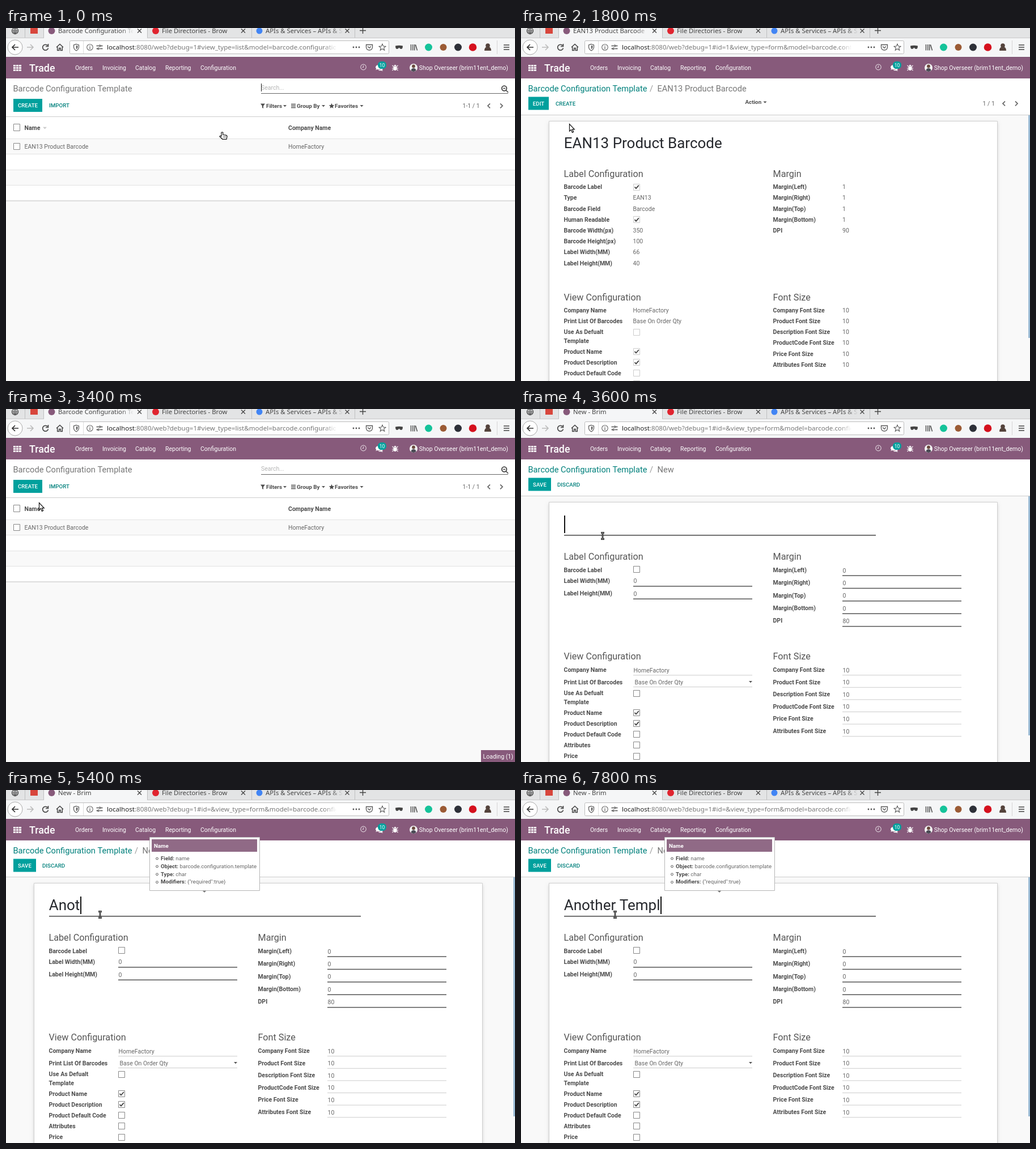
Recreate the animation shown at these times as an HTML page with a canvas. Size 898 by 623 pixels, loop 8000 ms.

```html
<!DOCTYPE html>
<html lang="en">
<head>
<meta charset="utf-8">
<title>Barcode Configuration Template</title>
<style>
html, body { margin: 0; width: 100%; height: 100%; overflow: hidden; background: #f9f9f9; }
canvas { display: block; }
</style>
</head>
<body>
<canvas id="stage" width="898" height="623"></canvas>
<script>
const c = document.getElementById('stage').getContext('2d');
const LOOP = 8000, BASE = 10.53, SMALL = 9.72, CRUMB = 14.65;
const PURPLE = '#875a7b', TEAL = '#00a09d', LINK = '#00807c', TEXT = '#666', LABEL = '#4c4c4c';
const UI = 'Roboto, sans-serif', CHROME = '"Noto Sans", "Open Sans", sans-serif';
const COMPANY = 'HomeFactory';

// y is the middle of the capital letters
function text(s, x, y, { size = BASE, weight = 400, color = TEXT, font = UI, align = 'left' } = {}) {
  c.font = `${weight} ${size}px ${font}`;
  c.fillStyle = color;
  c.textAlign = align;
  c.fillText(s, x, y + size * 0.355);
  return c.measureText(s).width;
}
const bold = (s, x, y, color = LABEL, size = BASE) => text(s, x, y, { weight: 700, color, size });

function rect(x, y, w, h, color) {
  c.fillStyle = color;
  c.fillRect(x, y, w, h);
}
function dot(x, y, r, color) {
  c.fillStyle = color;
  c.beginPath();
  c.arc(x, y, r, 0, 7);
  c.fill();
}
function ring(x, y, r, color, width = 1.3) {
  c.strokeStyle = color;
  c.lineWidth = width;
  c.beginPath();
  c.arc(x, y, r, 0, 7);
  c.stroke();
}
function path(d, x, y, stroke, width = 1.3, fill) {
  const p = new Path2D(d);
  c.save();
  c.translate(x, y);
  if (fill) { c.fillStyle = fill; c.fill(p); }
  if (stroke) { c.strokeStyle = stroke; c.lineWidth = width; c.stroke(p); }
  c.restore();
}
function frame(x, y, w, h, border, fill, r = 0) {
  c.beginPath();
  c.roundRect(x + 0.5, y + 0.5, w - 1, h - 1, r);
  c.fillStyle = fill;
  c.fill();
  c.strokeStyle = border;
  c.lineWidth = 1;
  c.stroke();
}
function fade(x, y, w, h, rgb) {
  const g = c.createLinearGradient(x, 0, x + w, 0);
  g.addColorStop(0, `rgba(${rgb},0)`);
  g.addColorStop(1, `rgb(${rgb})`);
  rect(x, y, w, h, g);
}
const caretDown = (x, y) => path('M-3 -1.5H3L0 1.7Z', x, y, null, 0, '#555');

function check(y, on, border = '#ccc') {
  frame(198, Math.round(y - 6), 12, 12, border, '#fff');
  if (on) path('M-3.5 0L-1 2.7L3.8 -2.8', 204, y, '#444', 1.8);
}
function button(s, w, y) {
  rect(13, y - 12, w, 23, TEAL);
  text(s, 13 + w / 2, y, { size: SMALL, weight: 500, color: '#fff', align: 'center' });
}
const action = (s, x, y) => text(s, x, y, { size: SMALL, weight: 500, color: LINK });

function pager(s, x, y) {
  text(s, x, y);
  path('M2 -4L-2 0L2 4', 852, y, '#666', 1.7);
  path('M-2 -4L2 0L-2 4', 874, y, '#666', 1.7);
}

function tab(s, x, end, rgb) {
  c.save();
  c.beginPath();
  c.rect(x, 0, end - x, 17);
  c.clip();
  text(s, x, 4.8, { size: 11.3, color: '#444', font: CHROME });
  c.restore();
  fade(end - 22, 0, 22, 16, rgb);
}

function chrome(title, url) {
  rect(0, 0, 898, 51, '#f5f6f7');
  rect(0, 0, 898, 17, '#e3e4e5');
  rect(0, 17, 898, 1, '#c9c9ca');
  rect(67, 0, 182, 18, '#f5f6f7');
  for (const x of [33, 66, 249, 433, 615]) rect(x, 0, 1, 17, '#bfbfc0');
  ring(16, 5, 5.5, '#444');
  path('M-5.5 0H5.5M0 -5.5V5.5M-5 3H5M0 -5.5Q-5 0 0 5.5Q5 0 0 -5.5', 16, 5, '#444', 0.9);
  rect(43, 0, 13, 10, '#d8463c');
  dot(80.5, 5, 6, PURPLE);
  dot(264, 5, 6, '#e0242f');
  dot(447, 5, 5.5, '#4285f4');
  tab(title, 92, 225, '245,246,247');
  tab('File Directories - Brow', 275, 411, '227,228,229');
  tab('APIs & Services – APIs & S', 458, 595, '227,228,229');
  for (const x of [235.5, 418.5, 602]) path('M-3.5 -3.5L3.5 3.5M3.5 -3.5L-3.5 3.5', x, 5, '#444', 1.3);
  path('M-5.5 0H5.5M0 -5.5V5.5', 629.5, 4.5, '#444', 1.4);

  dot(16, 34, 13, '#fff');
  ring(16, 34, 13, '#aaa', 1);
  path('M6 0H-5M0 -5L-5 0L0 5', 16, 34, '#333', 1.7);
  path('M-6 0H5M0 -5L5 0L0 5', 43, 34, '#bbb', 1.6);
  path('M4 -3A5 5 0 1 0 5 1.5M5 -6V-1.5H0.5', 69.5, 34, '#444', 1.6);
  path('M-6 0L0 -5.5L6 0M-4.3 -1V5.5H-1.3V1.5H1.3V5.5H4.3V-1', 95, 34, '#444', 1.5);
  frame(112, 22, 564, 24, '#bdbdbd', '#fff', 2);
  path('M0 -5.5L4.5 -4V0Q4 4 0 6Q-4 4 -4.5 0V-4Z', 124, 34, '#555', 1.2);
  path('M0 -3.3L2.4 -2.5V0Q2 2.5 0 3.6Z', 124, 34, null, 0, '#555');
  rect(136, 23, 1, 22, '#ddd');
  ring(148, 34, 5.3, '#666', 1.1);
  rect(147.4, 31, 1.3, 1.3, '#666');
  rect(147.4, 33.3, 1.3, 4, '#666');
  path('M-5 -2.5H-1M2 -2.5H6M-5 2.5H-2M1 2.5H6', 164.5, 34, '#555', 1.4);
  ring(165.5, 31.5, 1.4, '#555', 1.1);
  ring(163, 36.5, 1.4, '#555', 1.1);
  c.save();
  c.beginPath();
  c.rect(177, 23, 405, 22);
  c.clip();
  const w = text('localhost', 178, 34.2, { size: 11.6, color: '#222', font: CHROME });
  text(url, 178 + w, 34.2, { size: 11.6, color: '#777', font: CHROME });
  c.restore();
  fade(560, 24, 24, 20, '255,255,255');
  for (const x of [613, 618, 623]) dot(x, 34, 1.4, '#555');
  path('M-5.5 -4.5H5.5V0Q5 5 0 5Q-5 5 -5.5 0ZM-2.8 -1.5L0 1.4L2.8 -1.5', 641, 34, '#555', 1.3);
  path('M0 -5.8L1.7 -1.9L5.8 -1.6L2.6 1.1L3.7 5.2L0 2.9L-3.7 5.2L-2.6 1.1L-5.8 -1.6L-1.7 -1.9Z', 664, 34, '#555', 1.1);
  path('M-6.5 -2.5Q0 -4 6.5 -2.5Q6.5 3 3.5 3Q1 3 0 0.6Q-1 3 -3.5 3Q-6.5 3 -6.5 -2.5Z', 693.5, 34, null, 0, '#444');
  path('M-5 -5V5.5M-1.7 -5V5.5M1.3 -5V5.5M3 -4.5L6 5.5', 719.5, 34, '#444', 1.4);
  dot(745.5, 34, 6.5, '#15c39a');
  dot(771.5, 34, 6, '#9b5b35');
  dot(797.5, 34, 6.5, '#2d3038');
  dot(823.5, 34, 6.8, '#d5101d');
  dot(850, 31, 3.8, '#54433c');
  path('M-6 6Q-6 -1 0 -1Q6 -1 6 6Z', 850, 34, null, 0, '#54433c');
  rect(866, 22, 1, 24, '#d5d5d5');
  path('M-5 -4H5M-5 0H5M-5 4H5', 883, 34, '#444', 1.4);
}

function navbar() {
  rect(0, 51, 898, 38, PURPLE);
  rect(0, 51, 898, 1, '#77506d');
  for (let i = 0; i < 9; i++) rect(13 + i % 3 * 5, 65 + Math.floor(i / 3) * 4, 4, 3, '#fff');
  text('Trade', 41, 70.5, { size: 17.8, weight: 500, color: '#fff' });
  const menu = { Orders: 122, Invoicing: 170, Catalog: 228, Reporting: 281, Configuration: 343 };
  for (const s in menu) text(s, menu[s], 70.5, { color: '#fff' });
  ring(630.5, 69, 4.8, '#d8c9d4', 1.2);
  path('M0 -3V0.5H-2', 630.5, 69, '#d8c9d4', 1.1);
  path('M-6 -1Q-5 -5 0 -5Q5 -4 4 1Q2 4 -3 3L-6 4L-4.5 2Q-6 1 -6 -1ZM5.5 -1Q8 2 5.5 4L7 6L3 5Q0 6 -1 4Q4 4 5.5 -1Z', 658, 70, null, 0, '#fff');
  c.beginPath();
  c.roundRect(656, 59, 15, 13, 6);
  c.fillStyle = TEAL;
  c.fill();
  text('10', 663.5, 65.7, { size: 8.5, color: '#fff', align: 'center' });
  path('M-5 -4L-3 -2M5 -4L3 -2M-5.5 1H5.5M-5 5L-3 3M5 5L3 3', 686.5, 70, '#fff', 1.1);
  path('M-3 -2H3V2Q2.5 5 0 5Q-2.5 5 -3 2ZM-2.3 -2.6Q-2 -5 0 -5Q2 -5 2.3 -2.6Z', 686.5, 70, null, 0, '#fff');
  dot(719, 70, 7, '#f2f2f2');
  dot(719, 67.5, 2.9, '#6b4a3e');
  path('M-4.5 5Q-4 1 0 1Q4 1 4.5 5Q0 9 -4.5 5Z', 719, 70, null, 0, '#4a4a55');
  text('Shop Overseer (brim11ent_demo)', 886, 70.5, { color: '#fff', align: 'right' });
}

function listPage(sorted, searchCaret) {
  rect(0, 89, 898, 67, '#fff');
  text('Barcode Configuration Template', 12.5, 107, { size: CRUMB, color: '#777' });
  text('Search...', 450, 105.5, { color: '#b5b5b5' });
  if (searchCaret) rect(450, 98, 1, 14, '#222');
  rect(450, 115, 436, 1, '#666');
  ring(879, 106.5, 4.3, '#444', 1.8);
  path('M0 0L4 4M-5 -3.3H-1', 882, 109.8, '#444', 1.6);
  button('CREATE', 51, 137);
  action('IMPORT', 76, 137);
  path('M-4 -4H4L1 0V4.5L-1 3V0Z', 453, 137.5, null, 0, LABEL);
  bold('Filters', 459, 137.3, LABEL, 9.9);
  caretDown(492, 137.5);
  path('M-4 -3H4M-4 0H4M-4 3H4', 507, 137.5, LABEL, 1.5);
  bold('Group By', 513, 137.3, LABEL, 9.9);
  caretDown(560, 137.5);
  path('M0 -4.8L1.4 -1.6L4.8 -1.3L2.2 0.9L3 4.3L0 2.5L-3 4.3L-2.2 0.9L-4.8 -1.3L-1.4 -1.6Z', 574.5, 137.5, null, 0, LABEL);
  bold('Favorites', 580, 137.3, LABEL, 9.9);
  caretDown(627.5, 137.5);
  pager('1-1 / 1', 805.5, 137.3);

  rect(0, 156, 898, 149, '#fff');
  rect(0, 156, 898, 1, '#ccc');
  rect(0, 195, 898, 28, '#f9f9f9');
  rect(0, 250, 898, 27, '#f9f9f9');
  for (const y of [195, 222, 250, 277]) rect(0, y, 898, 1, '#e2e2e2');
  rect(0, 304.5, 898, 1, '#c0c0c0');
  frame(13, 169, 12, 13, '#888', '#fff');
  frame(13, 203, 12, 12, '#888', '#fff');
  bold('Name', 32.5, 176.3);
  if (sorted) path('M-3.5 -1.7H3.5L0 2Z', 68.5, 176.5, null, 0, '#ccc');
  bold('Company Name', 498, 176.3);
  text('EAN13 Product Barcode', 32.5, 209.2);
  text(COMPANY, 498, 209.2);
}

function formPage(crumb, hover, thumbEnd) {
  rect(0, 89, 898, 64, '#fff');
  rect(0, 153, 898, 1, '#ccc');
  const w = text('Barcode Configuration Template', 12.5, 107, { size: CRUMB, color: hover ? '#005451' : LINK });
  text('/', 17 + w, 107, { size: CRUMB, color: '#999' });
  text(crumb, 240.5, 107, { size: CRUMB, color: '#777' });
  c.save();
  c.shadowColor = 'rgba(0,0,0,.2)';
  c.shadowBlur = 6;
  c.shadowOffsetY = 3;
  rect(50, 164, 790, 470, '#fff');
  c.restore();
  frame(49, 164, 792, 480, '#cfcfcf', '#fff');
  rect(895, 154, 3, thumbEnd - 154, '#9dbdd6');
}
const heading = (s, x, y) => text(s, x, y, { size: 16.2, color: '#555' });
const bigTitle = s => text(s, 75.7, 203.2, { size: 26, color: '#26282d' });

const MARGINS = ['Margin(Left)', 'Margin(Right)', 'Margin(Top)', 'Margin(Bottom)', 'DPI'];
const FONTS = ['Company', 'Product', 'Description', 'ProductCode', 'Price', 'Attributes'].map(s => s + ' Font Size');

function flags(y, border) {
  bold('Use As Defualt', 75.5, y);
  bold('Template', 75.5, y + 15.5);
  check(y, false, border);
  ['Product Name', 'Product Description', 'Product Default Code', 'Attributes', 'Price'].forEach((s, i) => {
    const row = y + 34.3 + i * 19.2;
    bold(s, 75.5, row);
    check(row, i < 2, border);
  });
}

function viewForm(hover) {
  formPage('EAN13 Product Barcode', hover, 547);
  button('EDIT', 36, 133.5);
  action('CREATE', 61, 133.5);
  bold('Action', 395.5, 131, LABEL, 9.8);
  caretDown(430.5, 131);
  pager('1 / 1', 814.5, 133.3);
  bigTitle('EAN13 Product Barcode');
  heading('Label Configuration', 75.5, 257.5);
  heading('Margin', 444.5, 257.5);
  const label = { 'Barcode Label': 1, Type: 'EAN13', 'Barcode Field': 'Barcode', 'Human Readable': 1,
    'Barcode Width(px)': '350', 'Barcode Height(px)': '100', 'Label Width(MM)': '66', 'Label Height(MM)': '40' };
  Object.entries(label).forEach(([s, v], i) => {
    const y = 280.5 + i * 19.2;
    bold(s, 75.5, y);
    if (v === 1) check(y, true); else text(v, 197.5, y);
  });
  MARGINS.forEach((s, i) => {
    bold(s, 444.5, 280.5 + i * 19.2);
    text(i < 4 ? '1' : '90', 567, 280.5 + i * 19.2);
  });
  heading('View Configuration', 75.5, 475);
  heading('Font Size', 444.5, 475);
  bold('Company Name', 75.5, 498);
  text(COMPANY, 197.5, 498);
  bold('Print List Of Barcodes', 75.5, 517.2);
  text('Base On Order Qty', 197.5, 517.2);
  flags(536.5);
  FONTS.forEach((s, i) => {
    bold(s, 444.5, 498 + i * 19.2);
    text('10', 567, 498 + i * 19.2);
  });
}

function field(s, v, x, y, strong, labelDy = 0) {
  bold(s, x, y + labelDy);
  const left = x < 400 ? 198 : 567;
  text(v, left + 0.5, y + 0.6);
  if (strong) rect(left, y + 9, 210, 1.5, '#555');
  else rect(left, y + 9, 210, 1, '#ccc');
}

function editForm(name, caret, popup) {
  formPage('New', false, 576);
  button('SAVE', 40, 133.5);
  action('DISCARD', 64, 133.5);
  rect(76, 222, 550, 1.5, '#444');
  const w = bigTitle(name);
  if (caret) rect(Math.round(76 + w), 188, 2, 31, '#111');
  if (popup) frame(75, 223, 550, 20, '#bbb', '#fff');
  heading('Label Configuration', 75.5, 260.5);
  heading('Margin', 444.5, 260.5);
  bold('Barcode Label', 75.5, 284);
  check(283, false, '#888');
  field('Label Width(MM)', '0', 75.5, 303, true);
  field('Label Height(MM)', '0', 75.5, 325.5, true);
  MARGINS.forEach((s, i) => field(s, i < 4 ? '0' : '80', 444.5, 284.3 + i * 22.4, true, -0.3));
  heading('View Configuration', 75.5, 436.5);
  heading('Font Size', 444.5, 436.5);
  field('Company Name', COMPANY, 75.5, 460.3, false);
  field('Print List Of Barcodes', '', 75.5, 481, false, 0.8);
  text('Base On Order Qty', 200.5, 482);
  caretDown(405, 481.5);
  flags(501.5, '#888');
  FONTS.forEach((s, i) => field(s, '10', 444.5, 460.2 + i * 21.6, false));
}

function tooltip(alpha) {
  c.save();
  c.globalAlpha = alpha;
  path('M-4 0H4L0 4Z', 350, 177, null, 0, '#777');
  frame(253, 83, 195, 95, '#b5b5b5', '#fff');
  rect(257, 87, 186, 22, '#906a86');
  bold('Name', 261, 98.3, '#fff', SMALL);
  const info = { 'Field:': 'name', 'Object:': 'barcode.configuration.template', 'Type:': 'char', 'Modifiers:': '{"required":true}' };
  Object.entries(info).forEach(([k, v], i) => {
    const y = 120.3 + i * 13.9;
    ring(266.5, y + 0.7, 1.9, '#555', 1);
    const w = bold(k, 273, y, LABEL, SMALL);
    text(v, 273 + w + 2.4, y, { size: SMALL });
  });
  c.restore();
}

function loading() {
  rect(838, 602, 60, 21, PURPLE);
  text('Loading (1)', 841.5, 613, { color: '#fff' });
}

// time, x, y, shape
const MOVES = [
  [0, 376, 183, 'hand'], [100, 300, 208, 'hand'], [400, 300, 208, 'hand'], [500, 171, 208, 'hand'],
  [700, 171, 208, 'hand'], [800, 174, 225, 'arrow'], [1500, 150, 428, 'arrow'], [1800, 85, 169, 'arrow'],
  [2300, 80, 108, 'hand'], [2400, 80, 108, 'hand'], [2500, 86, 115, 'beam'], [2700, 38, 142, 'hand'],
  [3300, 38, 142, 'hand'], [3400, 58, 165, 'arrow'], [3500, 58, 165, 'arrow'], [3600, 144, 224, 'beam'],
  [3700, 144, 224, 'beam'], [4000, 166, 220, 'beam'], [LOOP, 166, 220, 'beam']
];
function cursor(t) {
  const i = MOVES.findIndex(m => m[0] > t), a = MOVES[i - 1], b = MOVES[i];
  const k = (t - a[0]) / (b[0] - a[0]);
  const x = a[1] + (b[1] - a[1]) * k, y = a[2] + (b[2] - a[2]) * k;
  if (a[3] === 'hand') {
    path('M4 7V1.5Q5.5 0 6.8 1.5V5.5L12 6.2Q14.3 6.8 14 9L13 13.3H6L1 8.5Q1.5 6.5 4 8Z', x, y, '#111', 1.2, '#fff');
    path('M8.5 8V10.5M11 8V10.5', x, y, '#111', 0.9);
  } else if (a[3] === 'arrow') {
    path('M0.5 0.5V13.2L3.4 10.6L5.4 15.4L7.6 14.4L5.6 9.8H9.3Z', x, y, '#111', 1.2, '#fff');
  } else {
    const d = 'M-3 -5.5H3M0 -5.5V5.5M-3 5.5H3';
    path(d, x, y, '#222', 2.8);
    path(d, x, y, '#bbb', 0.7);
  }
}

// times at which each letter of the name appears
const NAME = 'Another Templ';
const KEYS = [4700, 5000, 5200, 5400, 5500, 5900, 6000, 6300, 6800, 7000, 7600, 7600, 7800];

function draw(now) {
  const t = Math.floor(now % LOOP / 100) * 100;
  const within = (a, b) => t >= a && t < b;
  const viewing = within(800, 2500), editing = t >= 3600;
  const tail = viewing ? 'id=1&view_type=form&model=barcode.configuration'
    : editing ? 'id=&view_type=form&model=barcode.configuration'
    : 'view_type=list&model=barcode.configuration';
  const title = editing ? 'New - Brim' : within(800, 2600) ? 'EAN13 Product Barcode' : 'Barcode Configuration Template';

  rect(0, 0, 898, 623, '#f9f9f9');
  if (viewing) viewForm(t >= 2200);
  else if (editing) {
    const typed = NAME.slice(0, KEYS.filter(k => k <= t).length);
    editForm(typed, t !== 4700 && t !== 7000, within(5000, 5200));
  } else listPage(t < 100, t < 500);
  chrome(title, ':8080/web?debug=1#' + tail);
  navbar();
  if (t >= 4700) tooltip(t < 4800 ? 0.97 : 1);
  if (t === 700 || t === 2500 || within(3400, 3600)) loading();
  cursor(t);
}

const start = performance.now();
function tick() {
  draw(performance.now() - start);
  requestAnimationFrame(tick);
}
tick();
</script>
</body>
</html>
```
